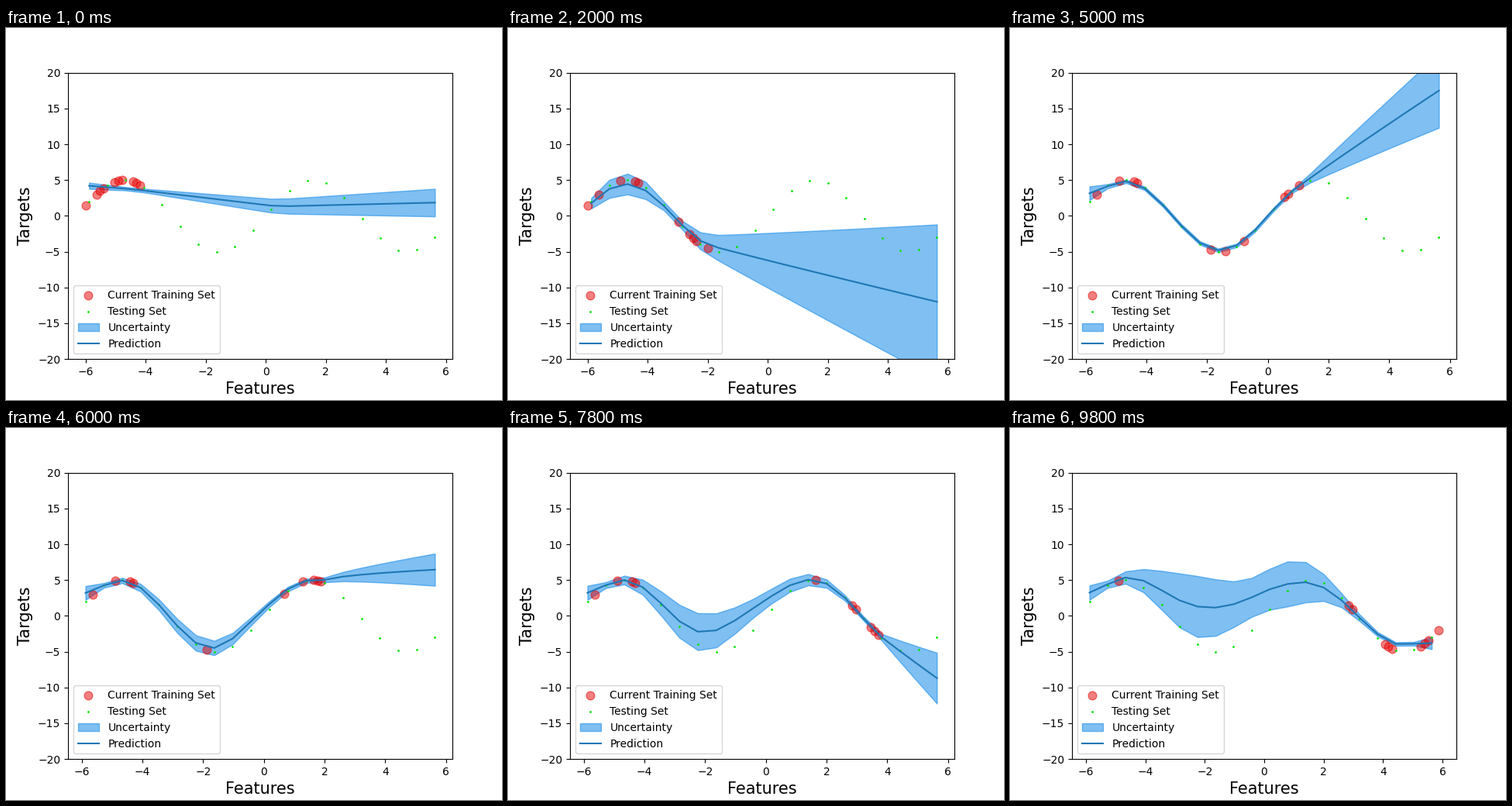
Animation, 640 px wide and 480 px high, one loop 10 s. Source, as a matplotlib script:

```python
import numpy as np
import matplotlib.pyplot as plt
from matplotlib.animation import FuncAnimation

FRAMES, STEP_MS = 50, 200
RED, GREEN, BLUE = "#e60000", "#00e600", "#0080e6"

# A sine on a regular grid, split by position modulo five
grid = np.linspace(-6, 6, 100)
train_x = grid[np.isin(np.arange(100) % 5, (0, 3, 4))]
test_x = grid[1::5]
START, END = test_x[0], test_x[-1]

# Samples that stay in the replay buffer, by the last step they are held
HELD = {6: [6], 10: [0], 18: [21, 23], 25: [22, 25], 30: [20, 33],
        39: [1, 7, 8, 37, 46], 49: [5, 43, 44, 49, 50, 51]}
held_until = {j: step for step, group in HELD.items() for j in group}

# Untrained fit: a bent line whose band widens to the right
BEND_X = [START, -4.4, 0.4, END]
BEND_Y = [4.2, 3.7, 1.32, 1.85]
BEND_W = [0.43, 0.2, 1.0, 1.93]

# Right end of the extrapolation and its half-width
KEY_STEPS = [10, 18, 25, 30, 36, 39, 49]
END_Y = [-12, -0.3, 17.5, 6.45, -8.3, -8.7, -3.8]
END_W = [10.8, 8.05, 5.2, 2.25, 3.2, 3.55, 0.85]


def target(x):
    return 5 * np.sin(x)


def bump(x, centre, width):
    return np.exp(-((x - centre) / width) ** 2)


def buffer(step):
    """Each step adds the next sample and drops the oldest one not held."""
    kept = list(range(10))
    for s in range(1, step + 1):
        kept.append(9 + s)
        kept.remove(next(j for j in kept if held_until.get(j, 0) < s))
    return kept


def learned(x, step):
    """Mean and half-width where samples have been seen."""
    age = max(0, step - 25) / 24
    gain = min(1, 0.84 + 0.005 * step) - 0.18 * age ** 4 * (x > 0)
    lag = np.clip((step - 10) / 12, 0, 1) * bump(x, START, 0.35)
    forgotten = 6.2 * age * bump(x, -0.35 - 1.1 * age, 0.8 + 1.1 * age)
    mean = gain * target(x) + 1.25 * lag + forgotten

    early = np.clip((25 - step) / 7, 0, 1)
    gaps = 4 * age * bump(x, -2.2, 1.8) + 2.7 * age ** 3 * bump(x, 1, 1.4)
    spread = 0.25 + 1.2 * early * abs(np.sin(x)) + 0.7 * lag + gaps
    return mean, spread


def fit(step):
    """Learned part up to the newest sample, then an extrapolated tail."""
    edge = min(train_x[9 + step], test_x[-2])
    mean, spread = learned(test_x, step)
    edge_y, edge_w = learned(edge, step)
    rise = np.interp(step, KEY_STEPS, END_Y) - edge_y
    widen = np.interp(step, KEY_STEPS, END_W) - edge_w

    u = np.clip((test_x - edge) / (END - edge), 0, 1)
    power = np.clip(abs(rise) / 6, 0.5, 0.97)
    mean = np.where(u > 0, edge_y + rise * u ** power, mean)
    spread = np.where(u > 0, edge_w + widen * u, spread)

    p = min(step / 10, 1) ** 1.7
    return (p * mean + (1 - p) * np.interp(test_x, BEND_X, BEND_Y),
            p * spread + (1 - p) * np.interp(test_x, BEND_X, BEND_W))


fig, ax = plt.subplots(figsize=(6.4, 4.8), dpi=100)
train = ax.scatter([0], [0], s=60, color=RED, alpha=0.5, zorder=2,
                   label="Current Training Set")
ax.scatter(test_x, target(test_x), s=1, color=GREEN, zorder=2,
           label="Testing Set")
band = ax.fill_between(test_x, -1, 1, color=BLUE, alpha=0.5,
                       label="Uncertainty")
line, = ax.plot(test_x, 0 * test_x, color="tab:blue", label="Prediction")
ax.set_ylim(-20, 20)
ax.set_xlabel("Features", fontsize=15)
ax.set_ylabel("Targets", fontsize=15)
ax.legend(loc="lower left")


def draw(step):
    x = train_x[buffer(step)]
    train.set_offsets(np.column_stack([x, target(x)]))

    mean, spread = fit(step)
    line.set_ydata(mean)
    upper = np.column_stack([test_x, mean + spread])
    lower = np.column_stack([test_x, mean - spread])
    band.set_verts([np.vstack([upper, lower[::-1]])])

    lo, hi = min(x[0], START), max(x[-1], END)
    pad = 0.05 * (hi - lo)
    ax.set_xlim(lo - pad, hi + pad)
    return train, band, line


anim = FuncAnimation(fig, draw, frames=FRAMES, interval=STEP_MS,
                     repeat=True, repeat_delay=0, blit=False)
plt.show()
```
